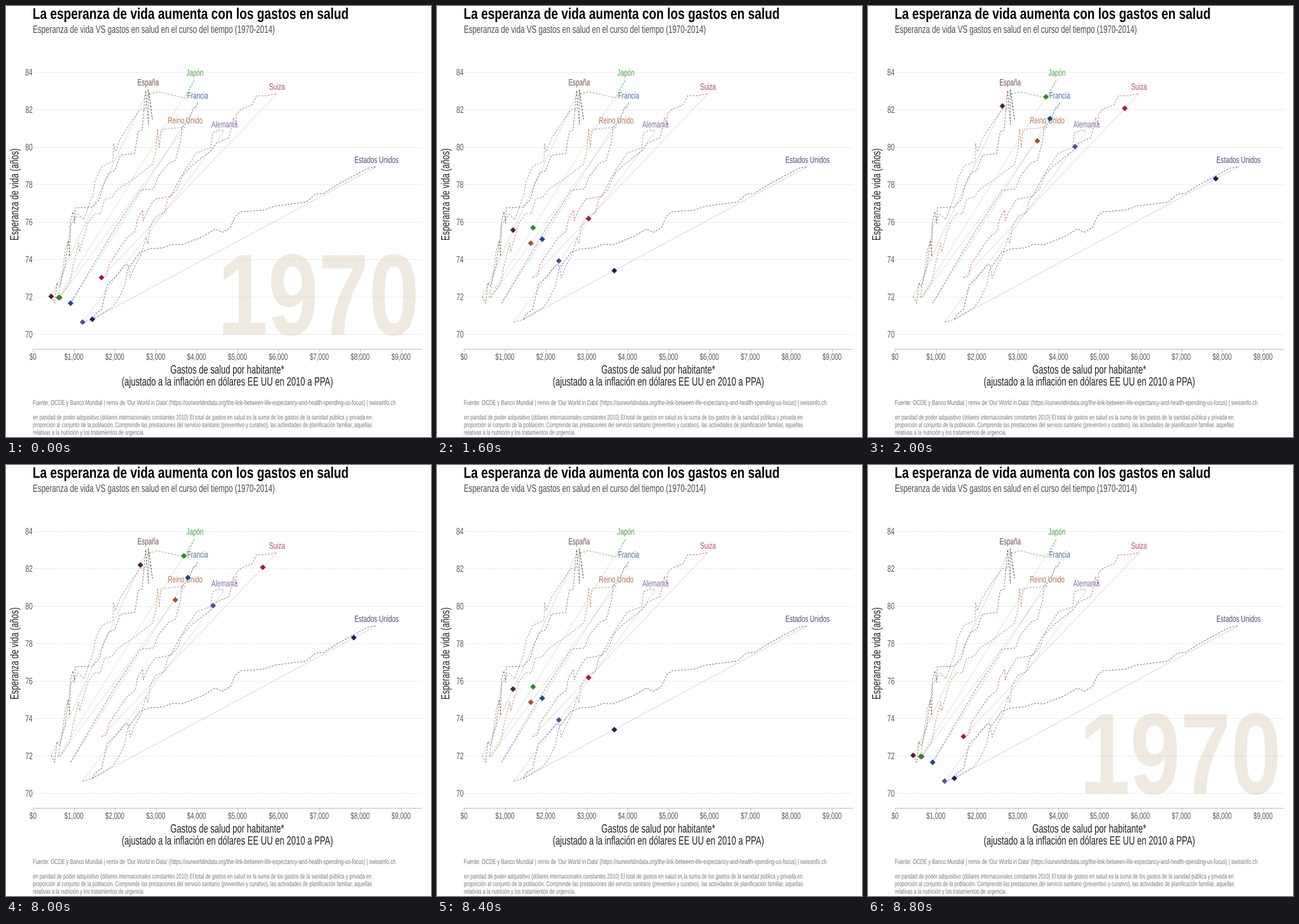
Recreate the animation shown at these times as a matplotlib script. Size 743x754 px, loop 10 s.

```python
import matplotlib.pyplot as plt
import numpy as np
from matplotlib.animation import FuncAnimation
from matplotlib.patches import PathPatch
from matplotlib.textpath import TextPath
from matplotlib.transforms import Affine2D

W, H, DPI = 743, 754, 64
PX = 72 / DPI
STEP = 200
FRAMES = 50
LIGHT, BOLD = 0.69, 0.785  # condensed face: one width factor per weight

fig = plt.figure(figsize=(W / DPI, H / DPI), dpi=DPI, facecolor="white")
ax = fig.add_axes([0, 0, 1, 1])
ax.set(xlim=(0, W), ylim=(H, 0))
ax.axis("off")


def label(x, y, s, size, color, align="left", bold=False, angle=0, **kw):
    """Condensed text with its baseline at y."""
    font = {"family": "Liberation Sans", "weight": "bold" if bold else "normal"}
    path = TextPath((0, 0), s, size=size, prop=font)
    box = path.get_extents()
    anchor = {"left": box.x0, "center": (box.x0 + box.x1) / 2, "right": box.x1}[align]
    place = (Affine2D().translate(-anchor, 0).scale(BOLD if bold else LIGHT, -1)
             .rotate_deg(angle).translate(x, y))
    return ax.add_patch(PathPatch(place.transform_path(path), fc=color, lw=0, **kw))


def line(xs, ys, color, width=1, **kw):
    return ax.plot(xs, ys, color=color, lw=width * PX, **kw)[0]


def ease(t):
    return 2 * t * t if t < 0.5 else 1 - 2 * (1 - t) ** 2


def progress(ms):
    """0 at the first year, 1 at the last one."""
    out = np.clip((ms - 1200) / 1000, 0, 1)
    back = np.clip((ms - 7800) / 1000, 0, 1)
    return ease(out) - ease(back)


class Country:
    def __init__(self, name, color, start, end, trail):
        self.start, self.end = np.array(start), np.array(end)
        xs, ys = zip(start, *trail, end)
        line(xs, ys, color, 1, alpha=0.68, dashes=(3.2, 2.4), dash_capstyle="butt", zorder=3)
        line(*zip(start, end), color, 0.8, alpha=0.24, zorder=3)
        label(end[0], end[1] - 6.5, name, 16, color, "center", alpha=0.8, zorder=4)
        self.mark = line([], [], color, 0, marker="D", ms=6.6 * PX, mew=0, zorder=5)

    def move(self, p):
        x, y = self.start + (self.end - self.start) * p
        self.mark.set_data([x], [y])


# Titles and footer
label(48, 22.5, "La esperanza de vida aumenta con los gastos en salud", 27, "black", bold=True)
label(48, 47, "Esperanza de vida VS gastos en salud en el curso del tiempo (1970-2014)", 18.6, "#4c4c4c")
label(387, 643, "Gastos de salud por habitante*", 21, "#222222", "center")
label(387, 664, "(ajustado a la inflación en dólares EE UU en 2010 a PPA)", 21, "#222222", "center")
label(21.5, 329.5, "Esperanza de vida (años)", 20.5, "#222222", "center", angle=-90)
label(47.5, 698, "Fuente: OCDE y Banco Mundial | remix de 'Our World in Data' "
      "(https://ourworldindata.org/the-link-between-life-expectancy-and-health-spending-us-focus)"
      " | swissinfo.ch", 12.4, "#777777")
NOTE = (
    "en paridad de poder adquisitivo (dólares internacionales constantes 2010) "
    "El total de gastos en salud es la suma de los gastos de la sanidad pública y privada en",
    "proporción al conjunto de la población. Comprende las prestaciones del servicio sanitario "
    "(preventivo y curativo), las actividades de planificación familiar, aquellas",
    "relativas a la nutrición y los tratamientos de urgencia.",
)
for i, text in enumerate(NOTE):
    label(47.5, 723.5 + 13.2 * i, text, 12, "#777777")

# Axes
for i, years in enumerate(range(84, 69, -2)):
    y = 115.5 + 65.5 * i
    line([47, 726], [y, y], "#c4c4c4", 1, dashes=(1, 2), dash_capstyle="butt", zorder=2)
    label(46, y + 6, str(years), 16.5, "#555555", "right")
line([47, 726], [599.5, 599.5], "#b5b5b5")
for i in range(10):
    x = 47 + 71.5 * i
    line([x, x], [599.5, 604], "#b5b5b5")
    label(x, 619, f"${1000 * i:,}", 15.8, "#555555", "center")

first, last = (label(x, 575, s, 202, "#efe9e0", "right", True, zorder=1)
               for x, s in ((716, "1970"), (719.5, "2014")))

countries = [
    Country("Estados Unidos", "#211c52", (151, 548), (648, 281), [
        (156, 539), (167, 531), (177, 488), (190, 475), (209, 452), (217, 455), (234, 431),
        (250, 425), (275, 423), (290, 417), (307, 418), (345, 403), (366, 390), (378, 396),
        (392, 388), (401, 368), (410, 360), (450, 357), (470, 350), (525, 343), (541, 329),
        (555, 328), (580, 312), (608, 297), (632, 284)]),
    Country("Alemania", "#574d98", (134, 553), (382, 219), [
        (152, 548), (186, 527), (197, 511), (207, 490), (214, 455), (217, 476), (225, 455),
        (235, 438), (245, 405), (248, 416), (252, 385), (262, 368), (277, 361), (283, 337),
        (300, 320), (312, 288), (333, 257), (358, 248), (361, 222), (372, 217)]),
    Country("Suiza", "#9e2031", (167, 475), (474, 153), [
        (176, 472), (180, 452), (211, 406), (226, 394), (230, 372), (239, 357), (240, 376),
        (246, 360), (260, 338), (288, 333), (305, 300), (324, 280), (360, 252), (368, 240),
        (390, 230), (398, 195), (402, 207), (403, 188), (412, 180), (430, 173), (438, 157),
        (455, 157)]),
    Country("Francia", "#1f468c", (113, 520), (335.5, 168.5), [
        (150, 457), (190, 390), (235, 322), (258, 320), (266, 298), (285, 275), (296, 270),
        (305, 238), (308, 212), (315, 205), (324, 190), (327, 178), (331, 179)]),
    Country("Reino Unido", "#9d5230", (94, 510), (313.5, 212), [
        (112, 483), (117, 455), (127, 415), (129, 430), (132, 418), (143, 380), (155, 363),
        (165, 364), (172, 338), (185, 335), (195, 321), (222, 303), (256, 277), (262, 254),
        (265, 215), (268, 247), (271, 216)]),
    Country("Japón", "#258b25", (91.5, 510), (330, 128.5), [
        (93, 500), (97, 478), (104, 425), (110, 410), (112, 385), (126, 364), (136, 374),
        (152, 330), (156, 305), (168, 280), (187, 272), (188, 240), (191, 255), (200, 232),
        (216, 207), (235, 181), (243, 182), (248, 155), (265, 150), (313, 161)]),
    Country("España", "#4c2326", (79, 508), (249, 145.5), [
        (85, 520), (89, 484), (93, 490), (103, 457), (109, 410), (111, 438), (113, 375),
        (117, 360), (120, 380), (121, 353), (150, 352), (163, 339), (170, 313), (180, 292),
        (190, 288), (200, 261), (225, 258), (231, 220), (238, 217), (244, 148), (249, 207),
        (249, 147), (256, 198)]),
]


def draw(i):
    p = progress(i * STEP)
    for country in countries:
        country.move(p)
    first.set_visible(p < 0.001)
    last.set_visible(p > 0.999)


anim = FuncAnimation(fig, draw, frames=FRAMES, interval=STEP, repeat=True, repeat_delay=0)
plt.show()
```
